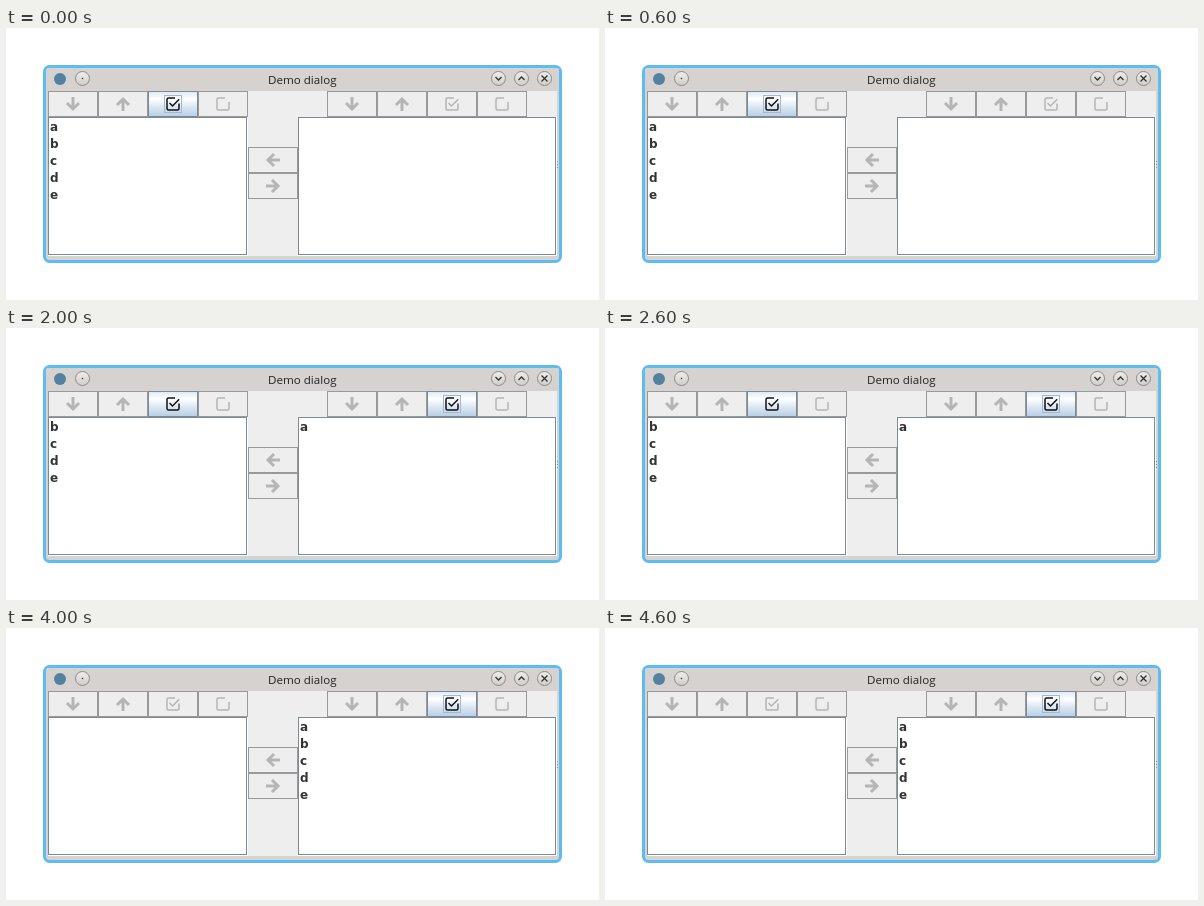
Write an HTML page that moves like this. It is 593 by 272 pixels and loops after 5000 ms.

```html
<!DOCTYPE html>
<html>
<head>
<meta charset="utf-8">
<style>
html, body { margin: 0; width: 100%; height: 100%; overflow: hidden; background: #fff; }
svg { display: block; }
.title { font: 11.6px "Open Sans", "Noto Sans", sans-serif; fill: #222; }
.item { font: bold 12px "DejaVu Sans", sans-serif; fill: #333; }
</style>
</head>
<body>
<svg width="593" height="272" viewBox="0 0 593 272">
  <defs>
    <linearGradient id="bar" x2="0" y2="1">
      <stop stop-color="#dfdcda"/><stop offset="1" stop-color="#d0cdca"/>
    </linearGradient>
    <linearGradient id="knob" x2="0" y2="1">
      <stop stop-color="#f0efee"/><stop offset="1" stop-color="#d0cdca"/>
    </linearGradient>
    <linearGradient id="button" x2="0" y2="1">
      <stop stop-color="#dde8f3"/><stop offset=".3" stop-color="#fff"/>
      <stop offset=".6" stop-color="#dde8f3"/><stop offset="1" stop-color="#b8cfe5"/>
    </linearGradient>
  </defs>
  <rect id="frame" x="38.5" y="38.5" width="516" height="195" rx="5" fill="#d6d2d0" stroke-width="3"/>
  <rect id="head" x="40" y="40" width="513" height="23" rx="2"/>
  <circle cx="54" cy="51" r="6" fill="#5382a1"/>
  <text class="title" x="262" y="56">Demo dialog</text>
  <g id="knobs" fill="none" stroke="#333" stroke-width="1.3"></g>
  <path d="M42 63H551V228H42Z" fill="#eee"/>
  <path d="M551.5 133v8" stroke="#8f8f8f" stroke-dasharray="1 2"/>
  <g id="view"></g>
</svg>
<script>
const byId = id => document.getElementById(id);

const box = "M2 -6H-4.5Q-6 -6 -6 -4.5V4.5Q-6 6 -4.5 6H4.5Q6 6 6 4.5V";
const icons = {
  down: "M0 -7V5M-6 -1L0 5L6 -1",
  up: "M0 7V-5M-6 1L0 -5L6 1",
  left: "M7 0H-5M1 -6L-5 0L1 6",
  right: "M-7 0H5M-1 -6L5 0L-1 6",
  all: box + "-.5M-3.5 -1L-.5 2L6.2 -4.7",
  none: box + "-2"
};

// Each button is keyed by side and icon
const buttons = { "mid left": [242, 119], "mid right": [242, 145] };
["down", "up", "all", "none"].forEach((name, i) => {
  buttons["L " + name] = [42 + 50 * i, 63];
  buttons["R " + name] = [321 + 50 * i, 63];
});

const steps = [
  { left: "abcde", right: "", on: ["L all"], focus: "L all" },
  { left: "abcde", right: "", picked: 1, on: ["L down", "L up", "L all", "L none", "mid right"] },
  { left: "bcde", right: "a", on: ["L all", "R all"], focus: "R all" },
  { left: "bcde", right: "a", picked: 4, on: ["L none", "mid right", "R all"] },
  { left: "", right: "abcde", on: ["R all"], focus: "R all" }
];

function button(key, on, focused) {
  const [x, y] = buttons[key];
  const name = key.split(" ")[1];
  const width = name == "all" || name == "none" ? 1.5 : 3;
  const ring = focused ? `<rect x="16.5" y="4.5" width="17" height="17" fill="none" stroke="#a3b8cc"/>` : "";
  return `<g transform="translate(${x} ${y})">
    <rect x=".5" y=".5" width="49" height="25" fill="${on ? "url(#button)" : "#eee"}" stroke="${on ? "#7a8a99" : "#999"}"/>
    ${ring}<path transform="translate(25 13)" d="${icons[name]}" fill="none" stroke="${on ? "#111" : "#b5b5b5"}" stroke-width="${width}"/></g>`;
}

// A list pane has a white highlight along its right and bottom edges
function list(x, width, items, picked = 0) {
  const rows = [...items].map((c, i) => `<text class="item" x="${x + 2}" y="${103 + 17 * i}">${c}</text>`);
  return `<rect x="${x}" y="89" width="${width}" height="139" fill="#fff"/>
    <rect x="${x + .5}" y="89.5" width="${width - 2}" height="137" fill="none" stroke="#7a8a99"/>
    <rect x="${x + 1}" y="90" width="${width - 3}" height="${17 * picked}" fill="#b8cfe5"/>${rows.join("")}`;
}

function show(step) {
  byId("frame").setAttribute("stroke", step.picked ? "#4dade2" : "#5dbdf3");
  byId("head").setAttribute("fill", step.picked ? "url(#bar)" : "#d6d2d0");
  byId("view").innerHTML =
    list(42, 200, step.left, step.picked) + list(292, 259, step.right) +
    Object.keys(buttons).map(k => button(k, step.on.includes(k), k == step.focus)).join("");
}

byId("knobs").innerHTML = [
  [76, "M-.7 0H.7"],
  [492, "M-3 -1.5L0 1.5L3 -1.5"],
  [515, "M-3 1.5L0 -1.5L3 1.5"],
  [538, "M-3 -3L3 3M3 -3L-3 3"]
].map(([x, d]) => `<g transform="translate(${x + .5} 50.5)">
  <circle r="7" fill="url(#knob)" stroke="#8c8987" stroke-width="1"/><path d="${d}"/></g>`).join("");

let current = -1;
function tick() {
  const index = Math.floor(performance.now() % 5000 / 1000);
  if (index != current) show(steps[current = index]);
  requestAnimationFrame(tick);
}
tick();
</script>
</body>
</html>
```
